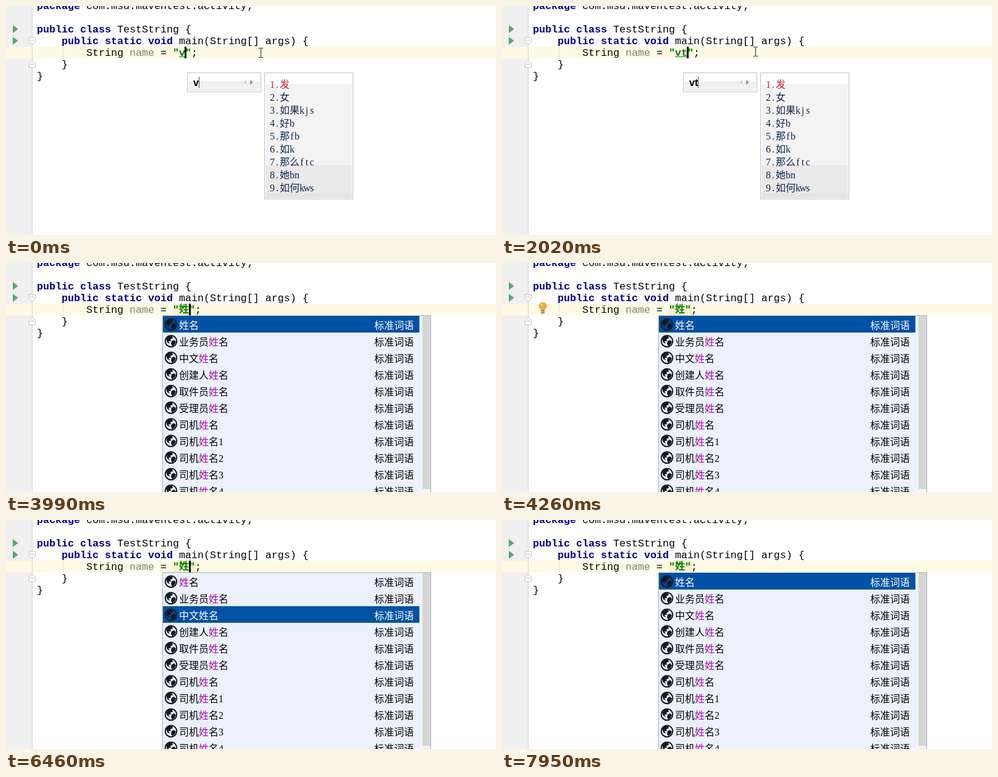
These frames come from a looping animation (793x372 px, 8000 ms). An HTML page with a canvas:

```html
<!DOCTYPE html>
<html lang="zh">
<head>
<meta charset="utf-8">
<style>
html, body { margin: 0; width: 100%; height: 100%; overflow: hidden; background: #fff; }
canvas { display: block; width: 793px; height: 372px; }
</style>
</head>
<body>
<canvas id="stage" width="793" height="372"></canvas>
<script>
const ctx = document.getElementById('stage').getContext('2d');
const LOOP = 8000, MONO = '"Liberation Mono", monospace', SERIF = '"Liberation Serif", serif';
const CJK = '"Noto Sans CJK SC", "Noto Sans CJK", sans-serif';
const NAVY = '#000080', GREEN = '#008000';

const lists = {
  v: ['发', '女', '如果kjs', '好b', '那fb', '如k', '那么ftc', '她bn', '如何kws'],
  vt: ['好多', '姓g', '姓名qk', '姓氏qa', '娇d', '好久不', '委托人ya', '好处', '姑且'],
  vtg: ['姓', '姓甚名谁'],
  after: ['姓名vtqk', '姓氏vtqa', '姓甚名谁vaqy']
};
const words = ['姓名', '业务员姓名', '中文姓名', '创建人姓名', '取件员姓名', '受理员姓名',
  '司机姓名', '司机姓名1', '司机姓名2', '司机姓名3', '司机姓名4'];

// Each event changes part of the state from its time (ms) onward.
const events = [
  [0, { typed: 'v', list: 'v', width: 144, caret: 1, mouse: [412, 68] }],
  [120, { typed: 'vt' }],
  [270, { list: 'vt', width: 162 }],
  [710, { caret: 0 }],
  [1020, { caret: 1 }],
  [1180, { bulb: 1 }],
  [1340, { caret: 0 }],
  [1620, { caret: 1 }],
  [1750, { typed: 'v', bulb: 0, mouse: [410, 66] }],
  [1880, { list: 'v', width: 144 }],
  [2020, { typed: 'vt' }],
  [2160, { list: 'vt', width: 162 }],
  [2280, { typed: 'vtg', list: 'vtg', width: 180 }],
  [2560, { typed: '姓', list: '', mouse: null }],
  [2700, { list: 'after', width: 184 }],
  [2990, { caret: 0 }],
  [3280, { caret: 1 }],
  [3560, { caret: 0 }],
  [3710, { caret: 1, list: '' }],
  [3850, { row: 0 }],
  [4120, { bulb: 1 }],
  [4260, { caret: 0 }],
  [4380, { caret: 1 }],
  [4660, { caret: 0 }],
  [4800, { caret: 1 }],
  [4930, { caret: 0 }],
  [5070, { caret: 1 }],
  [5200, { caret: 0 }],
  [5470, { caret: 1 }],
  [5740, { caret: 0 }],
  [6040, { caret: 1, bulb: 0 }],
  [6180, { row: 1 }],
  [6460, { row: 2 }],
  [6740, { row: 3 }],
  [6870, { caret: 0 }],
  [7130, { caret: 1 }],
  [7560, { row: 2 }],
  [7680, { row: 1 }],
  [7820, { row: 0 }],
  [7950, { caret: 0 }]
];

function stateAt(t) {
  const state = { row: -1, bulb: 0 };
  for (const [time, change] of events) if (time <= t) Object.assign(state, change);
  return state;
}

function rect(x, y, w, h, color) {
  ctx.fillStyle = color;
  ctx.fillRect(x, y, w, h);
}

function shape(points, fill, stroke) {
  ctx.beginPath();
  points.forEach(([x, y]) => ctx.lineTo(x, y));
  ctx.closePath();
  if (fill) { ctx.fillStyle = fill; ctx.fill(); }
  if (stroke) { ctx.strokeStyle = stroke; ctx.lineWidth = 1; ctx.stroke(); }
}

function disc(x, y, r, fill) {
  ctx.beginPath();
  ctx.arc(x, y, r, 0, Math.PI * 2);
  ctx.fillStyle = fill;
  ctx.fill();
}

function write(text, x, y, color, font) {
  ctx.font = font;
  ctx.fillStyle = color;
  ctx.fillText(text, x, y);
  return x + ctx.measureText(text).width;
}

// Latin letters sit centred in cells half as wide as a CJK character.
function mixed(text, x, y, color, size = 16) {
  for (const char of text) {
    const latin = char < '\u0250', cell = latin ? size / 2 : size;
    ctx.font = `${size}px ${latin ? SERIF : CJK}`;
    const inset = latin ? (cell - ctx.measureText(char).width) / 2 : 0;
    write(char, x + inset, y, color, ctx.font);
    x += cell;
  }
  return x;
}

function code(text, x, y, color = '#000', bold = false) {
  return write(text, x, y, color, `${bold ? 'bold ' : ''}16.667px ${MONO}`);
}

function foldMark(y, dir) {
  shape([[37.5, y - 5 * dir], [47.5, y - 5 * dir], [47.5, y + 2 * dir], [42.5, y + 6 * dir],
    [37.5, y + 2 * dir]], '#fff', '#c4c4c4');
  rect(40, y - 1, 5, 1, '#b0b0b0');
}

function lightBulb() {
  disc(66, 70, 6.5, '#f2a93b');
  shape([[62, 73], [70, 73], [69, 77], [63, 77]], '#f2a93b');
  disc(64, 68, 2, '#f8c777');
  rect(63, 77, 6, 2, '#777');
  rect(63, 80, 6, 2, '#777');
}

function textPointer(x, y) {
  rect(x, y + 1, 1, 14, '#222');
  for (const barY of [y, y + 15]) {
    rect(x - 3, barY, 3, 1, '#222');
    rect(x + 1, barY, 3, 1, '#222');
  }
}

function editor(s) {
  rect(0, 0, 793, 372, '#fff');
  rect(0, 0, 42, 372, '#f0f0f0');
  rect(0, 66, 793, 19, '#fffae3');
  rect(42, 0, 1, 372, '#d4d4d4');
  rect(92, 66, 1, 19, '#dedcd0');
  for (const y of [37.5, 56.5]) shape([[11, y - 6.5], [19.5, y], [11, y + 6.5]], '#59a869');
  foldMark(56, 1);
  foldMark(95, -1);

  code(' com.msd.maventest.activity;', code('package', 50, 5, NAVY, true), 5);
  code(' TestString {', code('public class', 50, 43, NAVY, true), 43);
  code(' main(String[] args) {', code('public static void', 90, 62, NAVY, true), 62);
  code('}', 90, 100);
  code('}', 50, 119);

  if (s.row >= 0) rect(270, 66, 37, 19, '#f9efcd');
  code('String ', 130, 81);
  code('name', 200, 81, '#808080');
  code('=', 250, 81);
  code('"', 270, 81, GREEN, true);
  const composing = s.typed !== '姓';
  let end;
  if (composing) {
    end = code(s.typed, 280, 81, GREEN, true);
    rect(280, 82, end - 280, 1, GREEN);
  } else {
    end = write(s.typed, 280, 80, GREEN, `bold 16px ${CJK}`);
  }
  code(';', code('"', end, 81, GREEN, true), 81);
  if (s.caret) rect(Math.round(end) - (composing ? 1 : 0), 66, 3, 19, '#000');
  if (s.bulb) lightBulb();
  if (s.mouse) textPointer(...s.mouse);
}

function panel(x, w, h) {
  rect(x, 108, w, h, '#c3c3c3');
  rect(x + 1, 109, w - 2, h - 2, '#fff');
}

function arrows(x, y, right) {
  shape([[x + 5, y - 4], [x, y], [x + 5, y + 4]], '#d2d2d2');
  shape([[x + 11, y - 4], [x + 16, y], [x + 11, y + 4]], right);
}

function hintPanel() {
  panel(300, 256, 37);
  rect(302, 127, 252, 16, '#f1f1f1');
  const shade = ctx.createLinearGradient(0, 113, 0, 141);
  shade.addColorStop(0, '#fff');
  shade.addColorStop(1, '#e9e9e9');
  rect(391, 113, 128, 28, shade);
  rect(390, 114, 1, 27, '#c6c6c6');
  rect(518, 114, 1, 27, '#c6c6c6');
  ctx.beginPath();
  ctx.arc(404, 126, 4.5, 2.2, 0.95 + Math.PI * 2);
  ctx.strokeStyle = '#65708a';
  ctx.lineWidth = 1;
  ctx.stroke();
  rect(402, 130, 5, 1, '#65708a');
  rect(402, 132, 5, 1, '#65708a');
  rect(404, 125, 1, 5, '#65708a');
  mixed('拼音编码：姓xìng', 414, 133, '#56627a', 12);
  arrows(527, 127, '#d2d2d2');
}

function inputPanel(text) {
  panel(293, 120, 32);
  rect(295, 122, 116, 16, '#f1f1f1');
  const end = write(text, 303, 130, '#000', 'bold 16px "Liberation Sans", sans-serif');
  rect(Math.round(end), 115, 1, 18, '#107030');
  arrows(384, 124, '#999');
}

function candidates(s) {
  const x = s.list === 'after' ? 561 : 418;
  panel(x, s.width, 206);
  rect(x + 2, 127, s.width - 4, 132, '#f3f3f3');
  rect(x + 2, 259, s.width - 4, 45, '#e9e9e9');
  rect(x + 2, 304, s.width - 4, 8, '#e4e4e4');
  lists[s.list].forEach((word, i) =>
    mixed(`${i + 1}.${word}`, x + 9, 133 + i * 21, i ? '#10274f' : '#d0262c'));
}

function globe(x, y, selected) {
  disc(x, y, 10.3, '#111820');
  disc(x, y, 8.3, selected ? '#0a4384' : '#e6ecf5');
  const land = points => shape(points.map(([px, py]) => [x + px, y + py]), '#111820');
  land([[-8, -4], [-4, -8], [2, -8], [3, -5], [-1, -3], [0, 0], [-4, 0], [-2, 4], [-6, 2]]);
  land([[1, 0], [5, -2], [8, 1], [6, 5], [2, 8], [0, 4]]);
}

function completion(selected) {
  rect(253, 85, 435, 287, '#a9b1bb');
  rect(254, 86, 433, 286, '#ebf2fe');
  rect(669, 86, 18, 286, '#f1f3f6');
  rect(674, 86, 13, 281, '#d6d6d6');
  words.forEach((word, i) => {
    const y = 86 + i * 27, active = i === selected;
    const color = active ? '#fff' : '#000';
    if (active) rect(254, y, 415, 27, '#0052a4');
    globe(267, y + 14, active);
    const [before, after] = word.split('姓');
    let x = mixed(before, 280, y + 21, color);
    x = mixed('姓', x, y + 21, active ? '#fff' : '#b000b0');
    mixed(after, x, y + 21, color);
    mixed('标准词语', 596, y + 21, color);
  });
}

function frame(now) {
  const s = stateAt(now % LOOP);
  editor(s);
  if (s.list) {
    if (s.list === 'after') hintPanel(); else inputPanel(s.typed);
    candidates(s);
  }
  if (s.row >= 0) completion(s.row);
}

const start = performance.now();
function tick() {
  frame(performance.now() - start);
  requestAnimationFrame(tick);
}
tick();
</script>
</body>
</html>
```
